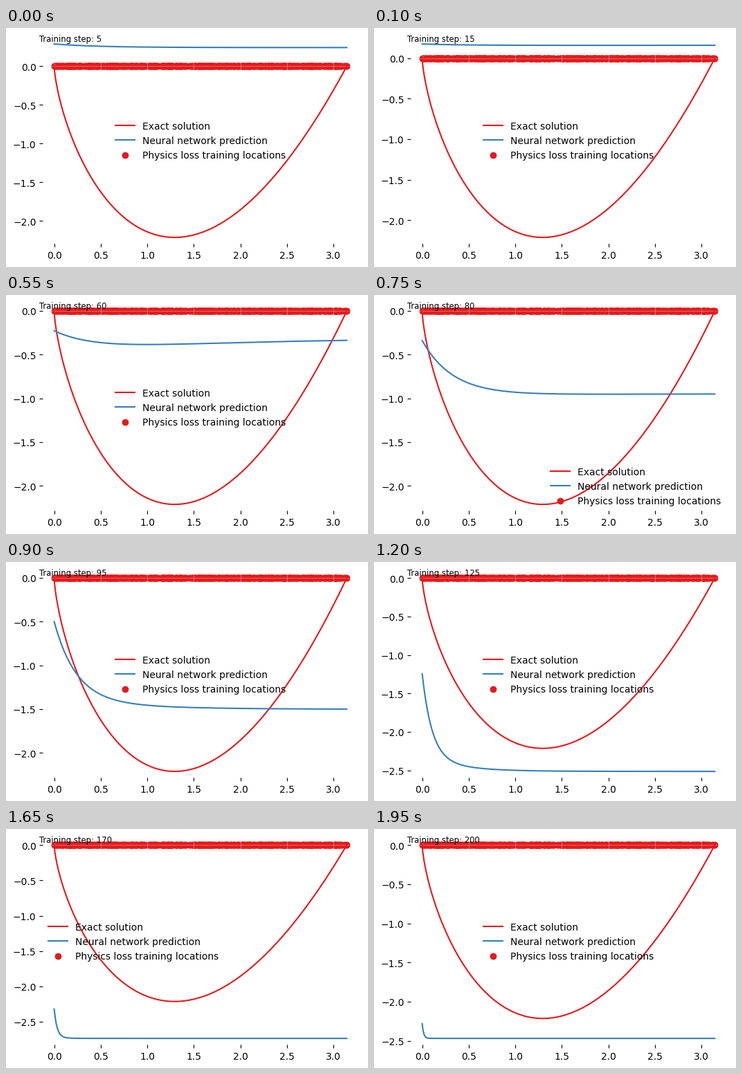
A matplotlib script that plays this animation: 523x346 px, repeating every 2000 ms.

```python
import numpy as np
import matplotlib.pyplot as plt
from matplotlib.animation import FuncAnimation
from matplotlib.transforms import ScaledTranslation

W, H, DPI = 523, 346, 100
LEFT, BOTTOM = 48.486, 28.86
FRAMES, INTERVAL, STEP = 40, 50, 5
RED, BLUE = "#e41a1c", "#377eb8"

plt.rcParams.update({
    "font.family": "DejaVu Sans",
    "font.size": 10,
    "xtick.direction": "in",
    "ytick.direction": "in",
    "axes.axisbelow": "line",
})

# Key points of the prediction's left edge and plateau during training
KEYS = np.array([5, 30, 60, 95, 125, 150, 170, 200], float)
EDGE = np.array([0.288, 0.015, -0.226, -0.5, -1.245, -1.93, -2.32, -2.28])
PLATEAU = np.array([0.242, 0.03, -0.31, -1.503, -2.512, -2.868, -2.735, -2.467])


def ease(s, v):
    """Smooth cubic path through the key points."""
    m = np.gradient(v, KEYS)
    k = int(np.clip(np.searchsorted(KEYS, s) - 1, 0, len(KEYS) - 2))
    h = KEYS[k + 1] - KEYS[k]
    u = (s - KEYS[k]) / h
    blend = u * u * (3 - 2 * u)
    return (v[k] + blend * (v[k + 1] - v[k])
            + h * u * (1 - u) * ((1 - u) * m[k] - u * m[k + 1]))


def bump(s, center, width):
    return np.exp(-((s - center) / width) ** 2 / 2)


def predict(x, s):
    """Plateau plus a fast and a slow decay, both sharpening with training."""
    edge, plateau = ease(s, EDGE), ease(s, PLATEAU)
    fast = 0.5 / (1 + (s / 93) ** 4.5)
    tail = 0.21 * bump(s, 118, 22) - 0.2 * bump(s, 58, 16)
    return (plateau + (edge - plateau - tail) * np.exp(-x / fast)
            + tail * np.exp(-x / (3.6 * fast)))


x = np.linspace(0, np.pi, 1000)
sites = np.random.default_rng(3).uniform(0, np.pi, 600)

fig = plt.figure(figsize=(W / DPI, H / DPI), dpi=DPI, facecolor="white")
ax = fig.add_axes([LEFT / W, BOTTOM / H, 465 / W, 308 / H])
ax.spines[:].set_visible(False)
ax.grid(color="white", alpha=0.3, linewidth=0.8)

ax.plot(x, -x**0.7 * (np.pi - x), color=RED, label="Exact solution")
pred, = ax.plot(x, predict(x, STEP), color=BLUE, label="Neural network prediction")
ax.scatter(sites, np.zeros_like(sites), color=RED,
           label="Physics loss training locations")
legend = ax.legend(loc="best", frameon=False)
caption = fig.text(LEFT / W, 326 / H, "", fontsize="small")

# All labels sit a fraction of a pixel low
drop = ScaledTranslation(0, -0.86 / DPI, fig.dpi_scale_trans)
for text in legend.get_texts():
    text.set_transform(text.get_transform() + drop)


def drop_labels():
    pad = plt.rcParams["xtick.major.pad"]
    for labels, base in ((ax.get_xticklabels(), ax.get_xaxis_text1_transform(pad)),
                         (ax.get_yticklabels(), ax.get_yaxis_text1_transform(pad))):
        for label in labels:
            label.set_transform(base[0] + drop)


def update(i):
    step = STEP * (i + 1)
    pred.set_ydata(predict(x, step))
    ax.relim()
    ax.autoscale_view()
    drop_labels()
    caption.set_text(f"Training step: {step}")
    return pred, caption


anim = FuncAnimation(fig, update, frames=FRAMES, interval=INTERVAL,
                     repeat=True, repeat_delay=0)
plt.show()
```
